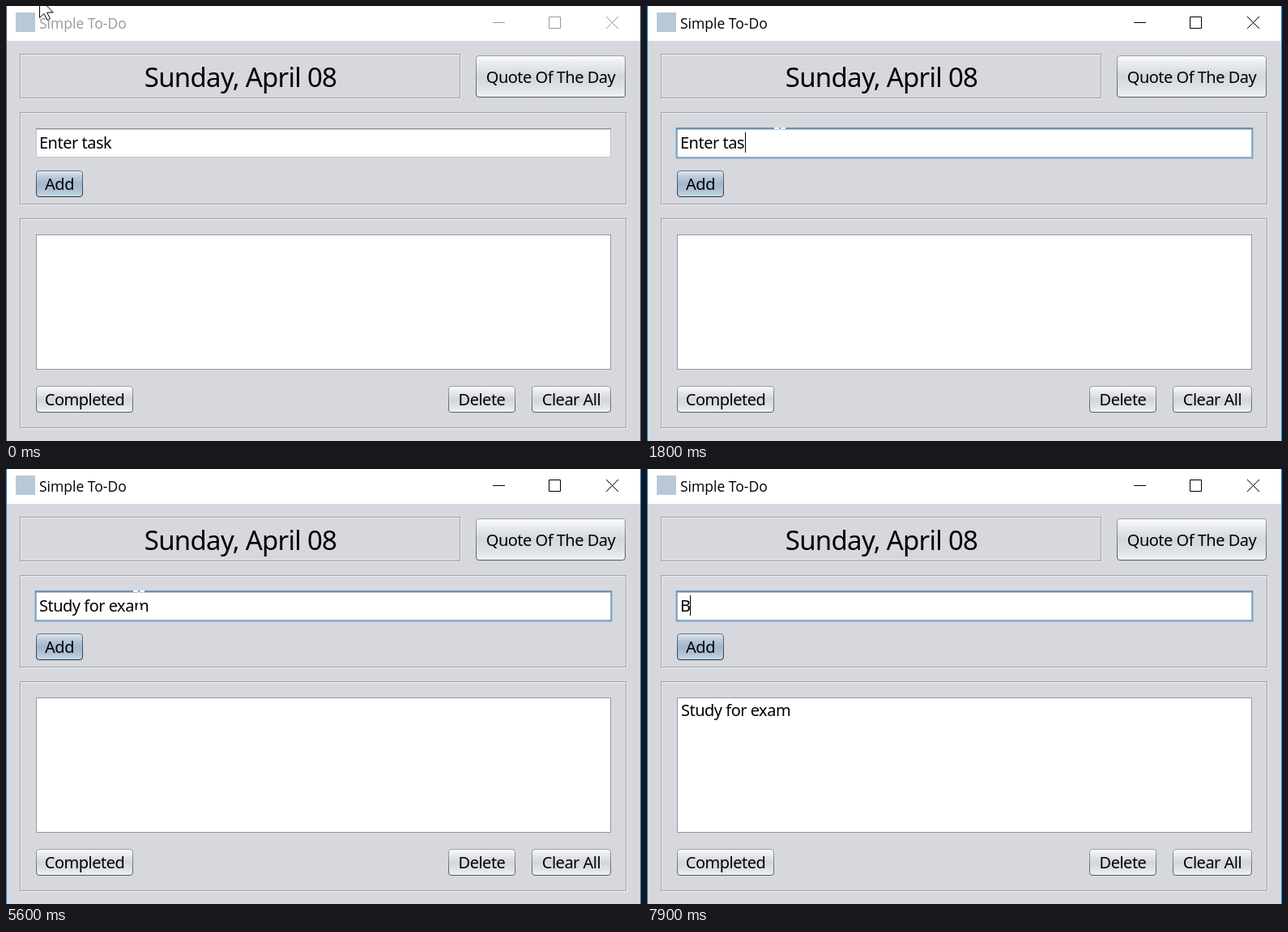
Write an HTML page that moves like this. It is 784 px wide and 537 px high and loops after 8000 ms.

```html
<!DOCTYPE html>
<html lang="en">
<head>
<meta charset="utf-8">
<title>To-do window</title>
<style>
  html, body { margin: 0; width: 100%; height: 100%; overflow: hidden; background: #d6d8dd; }
  svg { display: block; width: 784px; height: 537px; }
  text { font: 20px "Noto Sans", "Open Sans", sans-serif; letter-spacing: -.025em; white-space: pre; }
  .middle { text-anchor: middle; }
  #date { font-size: 33px; letter-spacing: -.022em; }
  #title { font: 17.5px "Open Sans", "Noto Sans", sans-serif; letter-spacing: 0; }
</style>
</head>
<body>
<svg id="stage" viewBox="0 0 784 537">
  <defs id="defs"></defs>
  <rect width="784" height="537" fill="#d6d8dd"/>
  <rect width="784" height="43" fill="#fff"/>
  <rect x="12" y="8" width="24" height="24" fill="#b9c8d6"/>
  <text id="title" x="41" y="28">Simple To-Do</text>
  <path id="controls" fill="none" d="M601 20.5h15M670.5 13.5h14v14h-14zM741 13l15 15M756 13l-15 15"/>
  <path id="edges" d="M.5 0v537M783.5 0v537"/>
  <g id="widgets"></g>
  <text id="date" class="middle" x="289.5" y="100">Sunday, April 08</text>
  <rect x="37.5" y="282.5" width="709" height="166" fill="#fff" stroke="#9297a1"/>
  <text id="item" x="42" y="305">Study for exam</text>
  <rect x="37.5" y="151.5" width="709" height="35" fill="#fff" stroke="#c0c3c9"/>
  <path d="M37 151.5h710" stroke="#85888f"/>
  <path d="M38 152.5h708" stroke="#d5d7db"/>
  <g id="focus">
    <rect x="36.5" y="151" width="711" height="36.5" fill="none" stroke="#79a5cf" stroke-width="2"/>
    <path d="M36 151.2h712" stroke="#6890b9" stroke-width="2"/>
  </g>
  <text id="entry" x="41" y="176"></text>
  <rect id="caret" y="156" width="1" height="25"/>
  <path id="beam" fill="none" stroke="#fff" stroke-width="2"
        d="M-7 1h6M1 1h6M0 2v22M-7 25h6M1 25h6"/>
  <path id="arrow" fill="#fff" stroke="#000"
        d="M.5.5v24l5.5-5 4 8 3.5-1.7-3.8-7.8h7.6z"/>
</svg>
<script>
const $ = id => document.getElementById(id);

function add(parent, tag, attrs, label = "") {
  const node = document.createElementNS("http://www.w3.org/2000/svg", tag);
  for (const key in attrs) node.setAttribute(key, attrs[key]);
  node.textContent = label;
  return parent.appendChild(node);
}

function gradient(id, colors) {
  const node = add($("defs"), "linearGradient", { id, x2: 0, y2: 1 });
  colors.forEach((color, i) =>
    add(node, "stop", { offset: i / (colors.length - 1), "stop-color": color }));
}

gradient("plain", ["#fafbfc", "#e5e7ec", "#d3d6dc", "#dde0e6", "#f0f2f6"]);
gradient("rim", ["#9a9ea6", "#555a63"]);
gradient("default", ["#e0e7ee", "#b9c8d7", "#a3b7ca", "#adc2d5", "#c5d8e8"]);
gradient("hover", ["#f4f7fa", "#d4e1ed", "#b9cfe2", "#c5dbed", "#deedfa"]);
gradient("pressed", ["#7e94aa", "#6d879f", "#5b7791", "#68849e", "#86a2bb"]);
gradient("darkRim", ["#66788c", "#22344a"]);

function panel(x, y, width, height) {
  const base = { width, height, fill: "none" };
  add($("widgets"), "rect", { ...base, x: x + 1.5, y: y + 1.5, stroke: "#eff0f3" });
  add($("widgets"), "rect", { ...base, x: x + .5, y: y + .5, stroke: "#9da0a6" });
}

function button(label, x, y, width, height, fill = "plain", rim = "rim") {
  const face = add($("widgets"), "rect", {
    x: x + .5, y: y + .5, width: width - 1, height: height - 1, rx: 3.5,
    fill: `url(#${fill})`, stroke: `url(#${rim})`
  });
  add($("widgets"), "text", { class: "middle", x: x + width / 2, y: y + height / 2 + 7.5 }, label);
  return face;
}

panel(17, 59, 543, 54);
panel(17, 131, 748, 113);
panel(17, 262, 748, 258);
button("Quote Of The Day", 580, 61, 185, 52);
const addRing = add($("widgets"), "rect", {
  x: 36, y: 202, width: 60, height: 35, rx: 5, fill: "none", stroke: "#79a5cf", "stroke-width": 2
});
const addFace = button("Add", 37, 203, 58, 33, "default", "darkRim");
button("Completed", 37, 469, 120, 33);
button("Delete", 546, 469, 83, 33);
button("Clear All", 649, 469, 98, 33);

const arrow = (x, y) => ({ pointer: ["arrow", x, y] });
const beam = (x, y) => ({ pointer: ["beam", x, y] });
const type = (text, caret) => ({ text, caret });

// Each step changes part of the state and holds until the next one.
const steps = [
  [0, { ...type("Enter task", 0), ...arrow(41, -10), active: false, focus: "", look: "default", listed: false }],
  [500, arrow(56, 6)],
  [600, arrow(78, 38)],
  [700, arrow(104, 74)],
  [800, arrow(127, 102)],
  [900, arrow(142, 120)],
  [1000, arrow(150, 131)],
  [1100, arrow(156, 139)],
  [1200, arrow(161, 145)],
  [1300, beam(164, 150)],
  [1400, { active: true, focus: "field", caret: 131 }],
  [1800, type("Enter tas", 121)],
  [2400, type("Enter t", 102)],
  [2500, type("Ente", 81)],
  [2600, type("E", 52)],
  [2700, type("", 41)],
  [3100, type("S", 52)],
  [3300, type("St", 59)],
  [3400, type("Stu", 70)],
  [3500, type("Stud", 81)],
  [3800, type("Study", 91)],
  [3900, type("Study ", 97)],
  [4000, type("Study f", 104)],
  [4100, type("Study fo", 114)],
  [4300, type("Study for", 121)],
  [4400, type("Study for ", 127)],
  [4700, type("Study for e", 138)],
  [4900, type("Study for ex", 148)],
  [5000, type("Study for exa", 159)],
  [5100, type("Study for exam", 176)],
  [5600, { caret: 0 }],
  [5800, beam(142, 159)],
  [5900, arrow(113, 189)],
  [6000, arrow(92, 200)],
  [6100, { ...arrow(78, 207), caret: 176, look: "hover" }],
  [6200, arrow(69, 211)],
  [6500, { look: "pressed", focus: "add", caret: 0 }],
  [6600, { look: "hover", listed: true, text: "" }],
  [6800, { ...arrow(78, 190), look: "default" }],
  [6900, beam(88, 156)],
  [7100, { focus: "field", caret: 41 }],
  [7500, { caret: 0 }],
  [7900, type("B", 53)]
];

let held = {};
const timeline = steps.map(([at, change]) => [at, held = { ...held, ...change }]);
const show = (node, visible) => node.setAttribute("visibility", visible ? "visible" : "hidden");

function render(state) {
  const ink = state.active ? "#000" : "#999";
  $("title").setAttribute("fill", ink);
  $("controls").setAttribute("stroke", ink);
  $("edges").setAttribute("stroke", state.active ? "#1b82d8" : "#46536a");
  $("entry").textContent = state.text;
  $("caret").setAttribute("x", state.caret);
  show($("caret"), state.caret);
  show($("focus"), state.focus === "field");
  show(addRing, state.focus === "add");
  addFace.setAttribute("fill", `url(#${state.look})`);
  show($("item"), state.listed);
  const [kind, x, y] = state.pointer;
  for (const id of ["arrow", "beam"]) show($(id), id === kind);
  $(kind).setAttribute("transform", `translate(${x} ${y})`);
}

const start = performance.now();
let current;
function tick() {
  const time = (performance.now() - start) % 8000;
  const state = timeline.filter(([at]) => at <= time).pop()[1];
  if (state !== current) render(current = state);
  requestAnimationFrame(tick);
}
tick();
</script>
</body>
</html>
```
